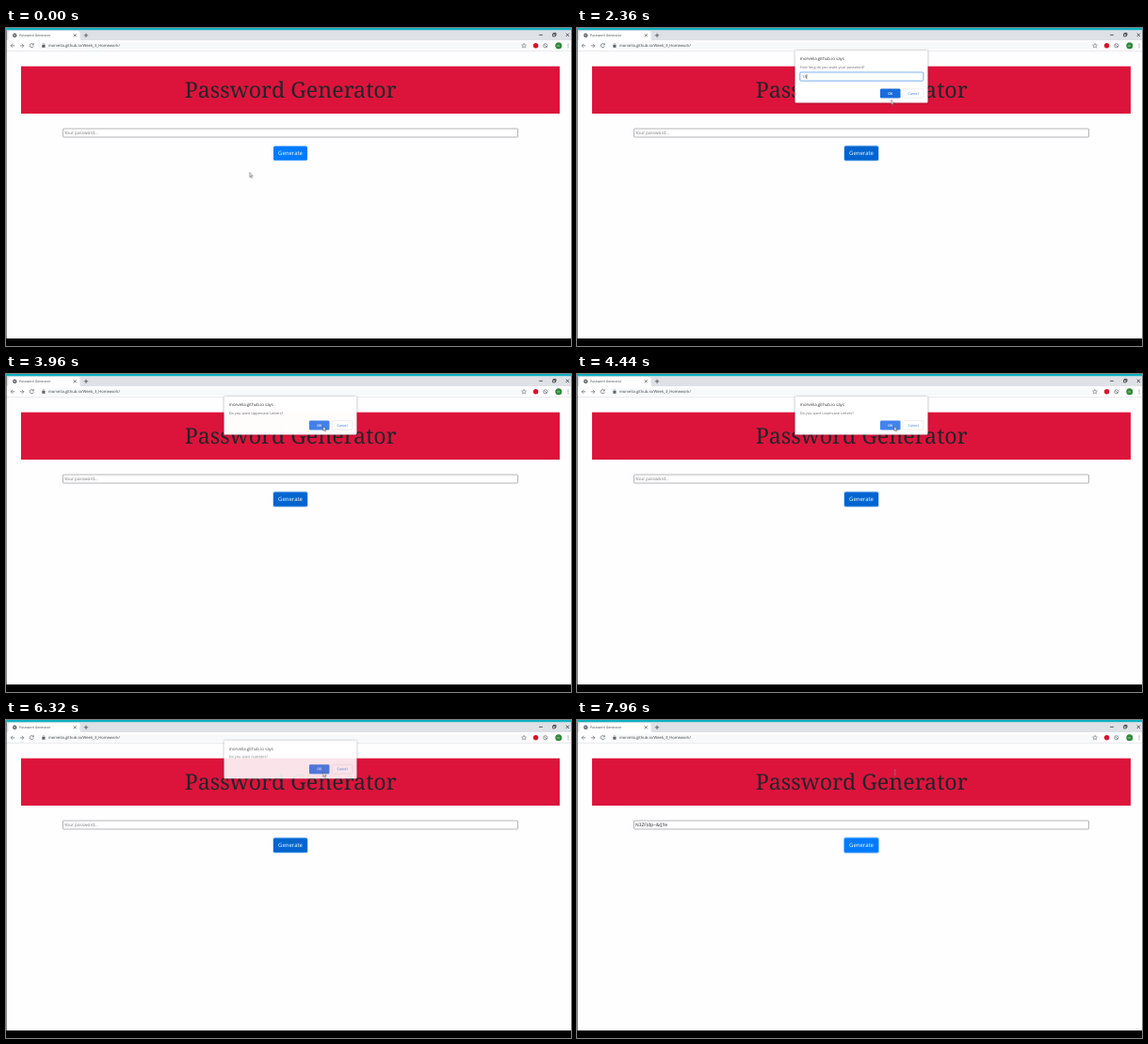
An HTML page for the animation above (8000 ms loop, 600 by 338 pixels).

```html
<!DOCTYPE html>
<html lang="en">
<head>
<meta charset="utf-8">
<title>Password Generator</title>
<style>
html, body { margin: 0; width: 100%; height: 100%; overflow: hidden; background: #fefdff; }
svg {
  display: block; width: 600px; height: 338px;
  font-family: "Open Sans", "Noto Sans", sans-serif;
  text-rendering: geometricPrecision;
}
.line { fill: none; stroke: #5f6368; stroke-width: .7; }
.mid { text-anchor: middle; }
.heading { font: 23.2px "Noto Serif", serif; fill: #212529; }
.msg { font-size: 3.82px; fill: #6a6d72; }

/* every animation shares one 8 s clock */
.dialog, .cursor, .cursor g, .button, .ring, .hint, .value, .typed, .caret {
  animation: 8s linear infinite;
}
.dialog { opacity: 0; filter: drop-shadow(0 .8px 1.2px rgba(0, 0, 0, .4)); }
.length { animation-name: length; }
.upper { animation-name: upper; }
.lower { animation-name: lower; }
.digits { animation-name: digits; }
.special { animation-name: special; }

@keyframes length {
  0%, 14.9% { opacity: 0; transform: translateY(-2.2px); }
  15% { opacity: .82; transform: translateY(-2.2px); }
  16.5%, 35.5% { opacity: 1; transform: none; }
  37%, 100% { opacity: 0; transform: translateY(-3.5px); }
}
@keyframes upper {
  0%, 37.2% { opacity: 0; transform: translateY(-3px); }
  38.4%, 49.5% { opacity: 1; transform: none; }
  51%, 100% { opacity: 0; transform: translateY(-3.5px); }
}
@keyframes lower {
  0%, 51.3% { opacity: 0; transform: translateY(-3px); }
  52.8%, 65.5% { opacity: 1; transform: none; }
  67%, 100% { opacity: 0; transform: translateY(-3.5px); }
}
@keyframes digits {
  0%, 67.4% { opacity: 0; transform: translateY(-3.5px); }
  68.9%, 78.4% { opacity: 1; transform: none; }
  79% { opacity: .9; transform: translateY(-2.2px); }
  80%, 100% { opacity: 0; transform: translateY(-3.5px); }
}
@keyframes special {
  0%, 80.3% { opacity: 0; transform: translateY(-3px); }
  81.8%, 91.2% { opacity: 1; transform: none; }
  92.7%, 100% { opacity: 0; transform: translateY(-3.5px); }
}

.cursor { animation-name: move; }
.cursor .arrow { animation-name: arrow; animation-timing-function: step-end; }
.cursor .hand { animation-name: hand; animation-timing-function: step-end; }
.cursor .beam { animation-name: late; animation-timing-function: step-end; }
@keyframes move {
  0%, .4% { transform: translate(258.5px, 153.5px); animation-timing-function: ease-in-out; }
  10.5%, 25% { transform: translate(292.5px, 140.6px); animation-timing-function: ease-in-out; }
  29.3%, 30% { transform: translate(333.5px, 76.5px); animation-timing-function: ease-in-out; }
  33%, 35.5% { transform: translate(333.2px, 71.5px); }
  38%, 41% { transform: translate(333.8px, 73.5px); animation-timing-function: ease-in-out; }
  45.5%, 100% { transform: translate(336.8px, 55.5px); }
}
@keyframes arrow { 0% { opacity: 1; } 9% { opacity: 0; } 26.2% { opacity: 1; } 92.5%, 100% { opacity: 0; } }
@keyframes hand { 0% { opacity: 0; } 9% { opacity: 1; } 26.2%, 100% { opacity: 0; } }
@keyframes late { 0% { opacity: 0; } 92.5%, 100% { opacity: 1; } }

.button { animation-name: press; fill: #007bff; }
.ring { animation-name: ring; animation-timing-function: step-end; }
@keyframes press {
  0%, 9% { fill: #007bff; }
  10.5%, 92.5% { fill: #0064d0; }
  94.5%, 100% { fill: #007bff; }
}
@keyframes ring { 0% { opacity: 0; } 13.5% { opacity: .55; } 92.5%, 100% { opacity: 1; } }

.hint, .value, .typed, .caret { animation-timing-function: step-end; }
.hint { animation-name: hint; }
.value { animation-name: late; }
.one { animation-name: one; }
.five { animation-name: five; }
.caret { animation-name: caret; }
@keyframes hint { 0% { opacity: 1; } 92.5%, 100% { opacity: 0; } }
@keyframes one { 0% { opacity: 0; } 20.5%, 100% { opacity: 1; } }
@keyframes five { 0% { opacity: 0; } 22.5%, 100% { opacity: 1; } }
@keyframes caret {
  0% { transform: none; }
  20.5% { transform: translateX(2.2px); }
  22.5%, 100% { transform: translateX(4.4px); }
}
</style>
</head>
<body>
<svg viewBox="0 0 600 338">
  <defs>
    <text id="site" x="236.8" y="34" font-size="4.4" fill="#303338">morvelia.github.io says</text>
    <g id="choices" font-size="3.6" class="mid">
      <rect x="322" y="49.5" width="21.5" height="10" rx="1.3" fill="currentColor"/>
      <text x="332.7" y="55.8" fill="#fff" font-weight="600">OK</text>
      <rect x="346.2" y="49.7" width="21.6" height="9.6" rx="1.3" fill="#fff" stroke="#dadce0" stroke-width=".5"/>
      <text x="357" y="55.8" fill="#1a73e8">Cancel</text>
    </g>
    <g id="confirm" color="#4083ec">
      <rect x="231.5" y="24" width="141" height="40.5" rx="1" fill="#fff"/>
      <use href="#site"/>
      <use href="#choices"/>
    </g>
  </defs>

  <!-- browser window -->
  <rect width="600" height="338" fill="#fefdff"/>
  <rect width="600" height="13.2" fill="#dee1e6"/>
  <rect width="600" height="2.2" fill="#0fb1c1"/>
  <path d="M1 13.2Q2.5 13 2.5 11V5Q2.5 3 4.5 3H76.5Q78.5 3 78.5 5V11Q78.5 13 80 13.2Z" fill="#fff"/>
  <rect y="13.2" width="600" height="11.3" fill="#fff"/>
  <path d="M0 24.5H600" stroke="#dcdde0" stroke-width=".6"/>
  <circle cx="9.3" cy="7.8" r="2.2" fill="#4d5156"/>
  <path d="M7.7 7.2l1.6.4.4 1.5M9.8 6.1l1 1.2" class="line" style="stroke:#fff"/>
  <text x="14" y="9.1" font-size="3.5" fill="#3c4043">Password Generator</text>
  <path d="M71.8 6.3l3 3m0-3l-3 3M82.8 7.8h4.4M85 5.6V10" class="line" style="stroke:#3c4043"/>
  <path d="M566.2 7.4h3.6M580.6 6.3h2.6v2.6h-2.6zM581.4 6.2v-.8h2.6V8h-.7M594.7 5.7l3.3 3.3m0-3.3l-3.3 3.3" class="line" style="stroke:#222"/>
  <path d="M9.2 18.8H5.2m1.9-2l-2 2 2 2" class="line"/>
  <path d="M14.8 18.8h4m-1.9-2l2 2-2 2" class="line"/>
  <path d="M29 17.4a2.1 2.1 0 1 0 .3 1.9M29.3 16.2v1.7h-1.7" class="line"/>
  <rect x="34" y="14.9" width="521" height="8" rx="4" fill="#f8f9fa"/>
  <rect x="38.3" y="18.1" width="3.2" height="2.6" rx=".3" fill="#5f6368"/>
  <path d="M39 18.2v-.7a.9.9 0 0 1 1.8 0v.7" class="line" style="stroke-width:.5"/>
  <text x="45" y="20.3" font-size="4.15" fill="#3c4043">morvelia.github.io/Week_3_Homework/</text>
  <path d="M550 16.3l.7 1.6 1.7.2-1.3 1.1.4 1.7-1.5-.9-1.5.9.4-1.7-1.3-1.1 1.7-.2z" class="line" style="stroke-width:.5"/>
  <circle cx="562.6" cy="18.8" r="2.7" fill="#d9122c"/>
  <circle cx="572.8" cy="18.8" r="2.1" class="line"/>
  <path d="M571.5 17.5l2.6 2.6" class="line"/>
  <circle cx="586.8" cy="18.8" r="3.5" fill="#2f8a3a"/>
  <text x="586.8" y="19.9" font-size="3.2" fill="#fff" class="mid">m</text>
  <g fill="#5f6368">
    <circle cx="597" cy="16.9" r=".5"/><circle cx="597" cy="18.8" r=".5"/><circle cx="597" cy="20.7" r=".5"/>
  </g>
  <path d="M.4 2.2V330" stroke="#55565a" stroke-width=".8"/>
  <rect y="330" width="600" height="8"/>

  <!-- page -->
  <rect x="16" y="40.7" width="572" height="50.3" fill="#dc143c"/>
  <text x="302.2" y="74" class="heading mid">Password Generator</text>
  <rect x="60.5" y="107" width="483" height="9" rx=".6" fill="#fff" stroke="#a2a3a7" stroke-width=".8"/>
  <text x="62" y="113.2" font-size="4.65" fill="#777" class="hint">Your password...</text>
  <text x="62" y="113.2" font-size="4.9" fill="#222" class="value">N3ZF(dp~&amp;([!!e</text>
  <rect x="283" y="124.6" width="38" height="17.2" rx="2.4" fill="#86c0ff" class="ring"/>
  <rect x="284" y="125.6" width="36" height="15.2" rx="1.6" class="button"/>
  <text x="302" y="135.3" font-size="6" fill="#fff" class="mid">Generate</text>

  <!-- dialogs -->
  <g class="dialog length" color="#1a6cdb">
    <rect x="231.5" y="24" width="141" height="55.5" rx="1" fill="#fff"/>
    <use href="#site"/>
    <text x="236.8" y="42.6" class="msg">How long do you want your password?</text>
    <rect x="236.8" y="47" width="131" height="9.2" rx="1" fill="#fff" stroke="#5b9bee" stroke-width=".8"/>
    <g font-size="3.82" fill="#333">
      <text x="239.3" y="53.1" class="typed one">1</text>
      <text x="241.5" y="53.1" class="typed five">5</text>
    </g>
    <rect x="239.2" y="49.2" width=".6" height="4.8" fill="#222" class="caret"/>
    <use href="#choices" y="15"/>
  </g>
  <g class="dialog upper"><use href="#confirm"/><text x="236.8" y="42.6" class="msg">Do you want Uppercase Letters?</text></g>
  <g class="dialog lower"><use href="#confirm"/><text x="236.8" y="42.6" class="msg">Do you want Lowercase Letters?</text></g>
  <g class="dialog digits"><use href="#confirm"/><text x="236.8" y="42.6" class="msg">Do you want numbers?</text></g>
  <g class="dialog special"><use href="#confirm"/><text x="236.8" y="42.6" class="msg">Do you want special characters?</text></g>

  <!-- pointer, tip at 0,0 -->
  <g class="cursor" stroke-linejoin="round">
    <g class="arrow">
      <path d="M0 0V4.9L1.1 3.9 1.9 5.5 2.6 5.2 1.9 3.6H3.3Z" fill="#fff" stroke="#222" stroke-width=".45"/>
    </g>
    <g class="hand">
      <path d="M-.6 .6Q0-.3 .6 .6V2.5L2.8 3Q3.3 3.2 3.2 3.8L2.6 6.3H-.4L-1.9 4.2Q-1.8 3.3-.6 4Z" fill="#fff" stroke="#222" stroke-width=".5"/>
    </g>
    <g class="beam">
      <path d="M0-2.4H1.8M.9-2.4V3M0 3H1.8" fill="none" stroke="#8a8f96" stroke-width=".6"/>
    </g>
  </g>
</svg>
</body>
</html>
```
